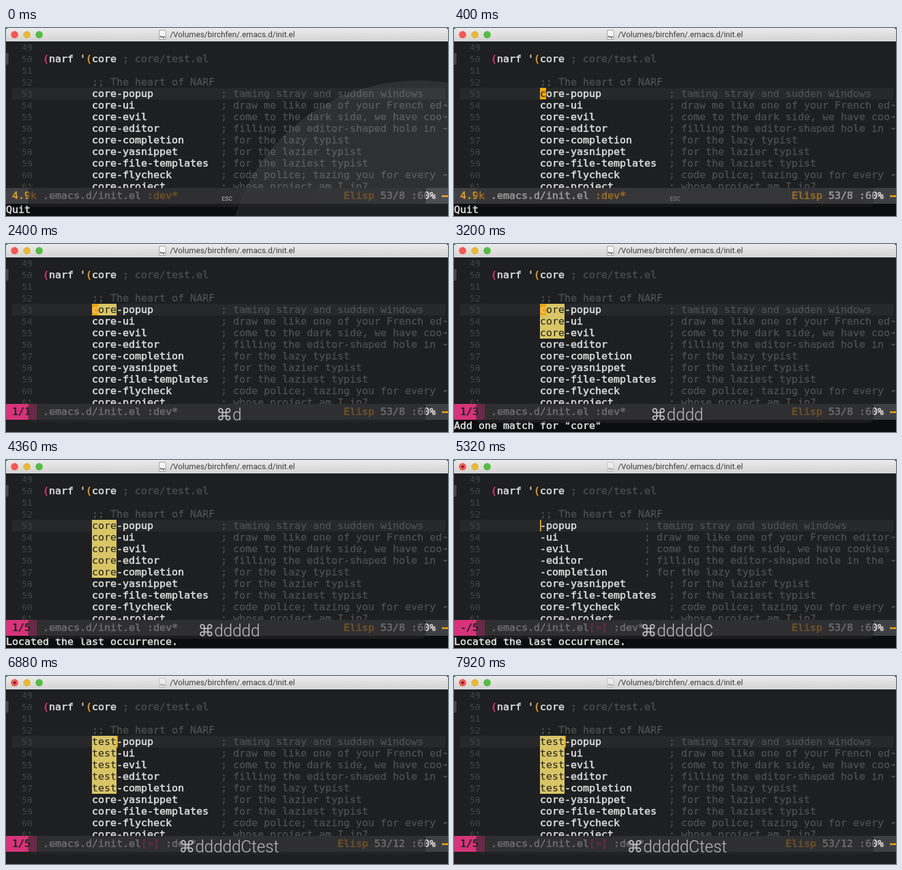
These frames come from a looping animation (720 px wide and 308 px high, 8000 ms). An HTML page:

```html
<!DOCTYPE html>
<html lang="en">
<head>
<meta charset="utf-8">
<title>Editing several matches</title>
<style>
  html, body { margin: 0; width: 100%; height: 100%; overflow: hidden; background: #1d1f21; }
  #stage {
    position: relative; width: 720px; height: 308px; overflow: hidden;
    background: #1d1f21; color: #dcdcda;
    font: 16.61px/19px "DejaVu Sans Mono", monospace;
  }
  #stage div { position: absolute; }
  #stage span { white-space: pre; }
  #titlebar {
    left: 0; top: 0; width: 720px; height: 22px; border-radius: 4px 4px 0 0;
    background: linear-gradient(#ebebeb, #d3d3d3); color: #3c3c3c;
    font: 13px/22px Roboto, "Open Sans", sans-serif;
  }
  #titlebar .light { top: 5px; width: 12px; height: 12px; border-radius: 50%; }
  #dot { left: 4px; top: 4px; width: 4px; height: 4px; border-radius: 50%; background: #5c1010; }
  #icon {
    left: 249px; top: 3px; width: 12px; height: 16px; border: 1px solid #999; background: #fafafa;
    box-sizing: border-box; border-radius: 1px 4px 1px 1px; color: #333;
    font: bold 5px/20px "DejaVu Sans", sans-serif; text-align: center;
  }
  #title { left: 267px; top: 0; white-space: nowrap; }
  #current { left: 10px; top: 98px; width: 706px; height: 19px; background: #26282a; }
  #rows { left: 0; top: 0; }
  .row { left: 0; width: 720px; height: 19px; }
  .number { left: 0; top: 0; width: 43px; text-align: right; font-size: 14.6px; color: #414446; }
  .code { left: 60px; top: 0; width: 650px; height: 19px; overflow: hidden; white-space: nowrap; }
  .more { left: 712px; top: 0; font-size: 11px; color: #707274; }
  .mark { left: 0; top: 0; width: 4px; height: 19px; background: #444648; }
  .fg { color: #dcdcda; -webkit-text-stroke: .6px; }
  .comment { color: #4d4f50; -webkit-text-stroke: .3px; }
  .pink { color: #e0306c; -webkit-text-stroke: .6px; }
  .orange { color: #e2991f; -webkit-text-stroke: .6px; }
  .match { background: #d9c566; color: #1d1f21; }
  .block { background: #f0a60e; color: #1d1f21; }
  .block.pale { color: #f3dfa0; }
  .block, .match { display: inline-block; height: 19px; vertical-align: top; }
  #bar { top: 98px; width: 2px; height: 19px; background: #f0a60e; }
  #disc {
    left: 360px; top: 86px; width: 624px; height: 624px; border-radius: 50%;
    background: rgba(255, 255, 255, .075);
  }
  #modeline { left: 0; top: 262px; width: 720px; height: 26px; line-height: 26px; background: #404044; }
  #left { left: 0; top: 0; white-space: nowrap; }
  #right { right: 20px; top: 0; white-space: nowrap; }
  #end { left: 710px; top: 12px; width: 10px; height: 3px; background: #e2991f; }
  .count { display: inline-block; height: 26px; vertical-align: top; background: #d6337a; color: #1d1f21; -webkit-text-stroke: .4px; }
  #echo { left: 0; top: 288px; width: 720px; height: 20px; line-height: 19px; }
  #caster {
    left: 36px; top: 262px; width: 648px; height: 31px; border-radius: 3px 3px 8px 8px;
    background: rgba(38, 38, 39, .62);
  }
  #keys {
    left: 3px; width: 100%; top: 0; text-align: center; color: #bdbdbd;
    font: 300 26.8px/36px Roboto, "DejaVu Sans", sans-serif;
  }
  #keys.small { left: 0; font-size: 9.5px; font-weight: 400; }
</style>
</head>
<body>
<div id="stage">
  <div id="current"></div>
  <div id="rows"></div>
  <div id="bar"></div>
  <div id="modeline"><div id="left"></div><div id="right"></div><div id="end"></div></div>
  <div id="echo"></div>
  <div id="disc"></div>
  <div id="caster"><div id="keys"></div></div>
  <div id="titlebar">
    <div class="light" style="left:8px;background:#f25a54"><div id="dot"></div></div>
    <div class="light" style="left:28px;background:#e3b83c"></div>
    <div class="light" style="left:48px;background:#58bd44"></div>
    <div id="icon">lsp</div>
    <div id="title">/Volumes/birchfen/.emacs.d/init.el</div>
  </div>
</div>
<script>
const LOOP = 8000;
const FIRST = 53;
const $ = id => document.getElementById(id);
const span = (cls, text) => text ? `<span class="${cls}">${text}</span>` : "";

const modules = [
  ["popup", "taming stray and sudden windows"],
  ["ui", "draw me like one of your French editors"],
  ["evil", "come to the dark side, we have cookies"],
  ["editor", "filling the editor-shaped hole in the emacs void"],
  ["completion", "for the lazy typist"],
  ["yasnippet", "for the lazier typist"],
  ["file-templates", "for the laziest typist"],
  ["flycheck", "code police; tazing you for every semicolon"],
  ["project", "whose project am I in?"],
];

// Each step changes part of the editor state from its time onward.
const steps = [
  [0, { word: "core", hits: 0, count: "", echo: "Quit", keys: "ESC", cursor: "", dirty: false }],
  [380, { cursor: "block" }],
  [900, { cursor: "" }],
  [1420, { cursor: "block" }],
  [2040, { keys: "⌘d" }],
  [2120, { hits: 1, count: "1/1", echo: "" }],
  [2440, { keys: "⌘dd" }],
  [2520, { hits: 2, count: "1/2", echo: 'Add one match for "core"' }],
  [2800, { keys: "⌘ddd" }],
  [2880, { hits: 3, count: "1/3" }],
  [3180, { keys: "⌘dddd" }],
  [3260, { hits: 4, count: "1/4" }],
  [3520, { keys: "⌘ddddd" }],
  [3600, { hits: 5, count: "1/5", echo: "Located the last occurrence." }],
  [4100, { cursor: "" }],
  [4600, { cursor: "block" }],
  [5100, { keys: "⌘dddddC" }],
  [5200, { word: "", count: "-/5", cursor: "bar", dirty: true }],
  [5760, { keys: "⌘dddddCt" }],
  [5860, { keys: "⌘dddddCte" }],
  [5920, { word: "t", count: "1/5", echo: "" }],
  [5960, { keys: "⌘dddddCtes" }],
  [6060, { keys: "⌘dddddCtest" }],
  [6080, { word: "te" }],
  [6200, { word: "tes" }],
  [6320, { word: "test" }],
  [6900, { cursor: "" }],
  [7400, { cursor: "bar" }],
];

function row(number, code, extra = "") {
  const top = 41 + (number - 50) * 19;
  return `<div class="row" style="top:${top}px">${extra}` +
    `<div class="number">${number}</div><div class="code">${code}</div></div>`;
}

function moduleRow([name, note], i, s) {
  const word = i < 5 ? s.word : "core";
  const wordClass = i < s.hits ? "match" : "fg";
  const onBlock = i === 0 && s.cursor === "block";
  const head = onBlock
    ? span(s.hits ? "block pale" : "block", word[0]) + span(wordClass, word.slice(1))
    : span(wordClass, word);
  const gap = " ".repeat(16 - name.length);
  const end = 8 + word.length + 1 + 16 + 2 + note.length;
  return row(FIRST + i,
    span("fg", " ".repeat(8)) + head + span("fg", "-" + name + gap) + span("comment", "; " + note),
    end > 65 ? '<div class="more">→</div>' : "");
}

function draw(s) {
  $("rows").innerHTML =
    row(49, "") +
    row(50, span("pink", "(") + span("fg", "narf '") + span("orange", "(") +
      span("fg", "core") + span("comment", " ; core/test.el"), '<div class="mark"></div>') +
    row(51, "") +
    row(52, span("comment", "        ;; The heart of NARF")) +
    modules.map((m, i) => moduleRow(m, i, s)).join("");

  $("bar").style.display = s.cursor === "bar" ? "" : "none";
  $("bar").style.left = 140 + s.word.length * 10 + "px";

  $("left").innerHTML =
    (s.count ? span("count", ` ${s.count} `) : span("orange", " 4.9k")) +
    span("fg", " .emacs.d/init.el") + (s.dirty ? span("pink", "[+]") : "") +
    span(s.count ? "fg" : "orange", " :dev*");
  const column = 8 + (s.dirty ? s.word.length : 0);
  $("right").innerHTML = span("orange", "Elisp") + span("fg", ` 53/${column} :60%`);

  $("echo").innerHTML = span("fg", s.echo);
  $("echo").style.background = s.echo ? "#0c0d0e" : "#1d1f21";
  $("keys").textContent = s.keys;
  $("keys").className = s.keys === "ESC" ? "small" : "";
  $("icon").style.opacity = s.dirty ? .45 : 1;
  $("dot").style.display = s.dirty ? "" : "none";
}

function casterOpacity(t) {
  if (t >= 2040) return 1;
  return t < 400 ? 1 - t / 1000 : Math.max(0, .6 * (960 - t) / 560);
}

const origin = performance.now();
let shown = -1;
function frame(now) {
  const t = Math.max(0, now - origin) % LOOP;
  const index = steps.filter(([time]) => time <= t).length - 1;
  if (index !== shown) {
    shown = index;
    draw(Object.assign({}, ...steps.slice(0, index + 1).map(step => step[1])));
  }
  $("caster").style.opacity = casterOpacity(t);
  $("disc").style.opacity = t < 40 ? 1 : t < 200 ? .4 : 0;
  requestAnimationFrame(frame);
}
frame(origin);
</script>
</body>
</html>
```
